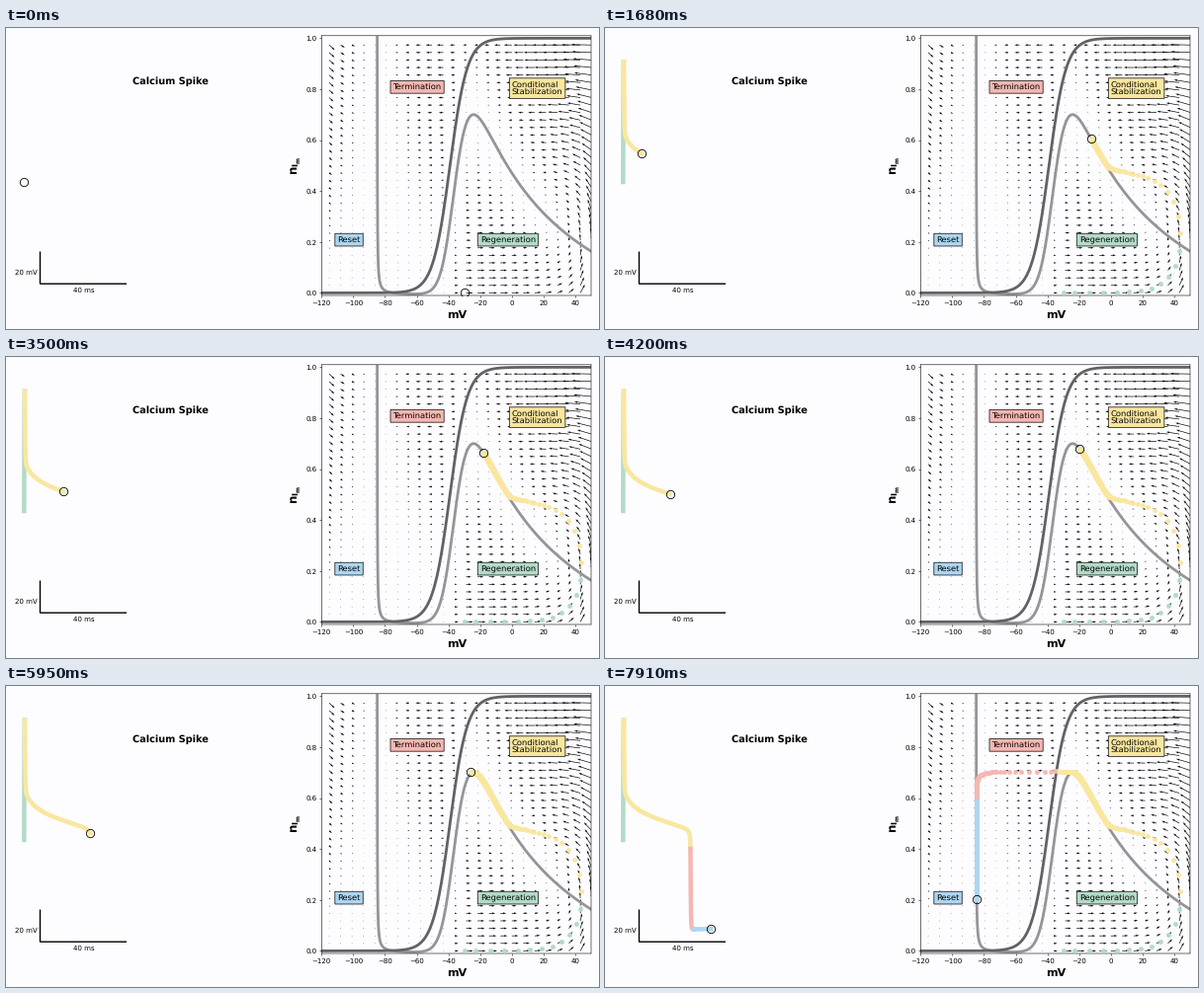
Write a matplotlib script that moves like this. It is 600 by 305 pixels and loops after 8000 ms.

```python
import math

import numpy as np
import matplotlib.pyplot as plt
from matplotlib.animation import FuncAnimation

W, H, DPI = 600, 305, 50
INTERVAL, FRAMES = 40, 200
TICK = 70               # ms between possible picture changes
DT = .025               # integration step, ms of model time
SUB = 20                # integration steps per visible step
LAST_STEP = 81
PLATEAU = 31            # model time at which the spike collapses

PAPER = "#fdfcfe"
GREEN, YELLOW, RED, BLUE = "#b3dbc8", "#f9e79f", "#f5b7b1", "#aed6f1"

plt.rcParams.update({"font.family": "DejaVu Sans", "text.hinting": "none",
                     "path.snap": False})


# Two-variable model: calcium and leak currents against an M-type current
def n_inf(v):
    return 1 / (1 + np.exp(-.185 * (v + 39)))


def nullcline(v, calcium):
    """Gate value at which the voltage stands still."""
    m = 1 / (1 + np.exp(-(v + 38.8) / 5.5))
    inward = calcium * m ** 2 * (115.7 - v)
    leak = .0087 * (-74.6 - v)
    return (inward + leak) / (v + 85)


def flow(v, n, calcium):
    dv = 8.2 * (v + 85) * (nullcline(v, calcium) - n)
    dn = .0043 * np.cosh(.09 * (v + 38.6)) * (n_inf(v) - n)
    return dv, dn


def simulate(calcium, duration):
    v, n, path = -30.0, 0.0, []
    for _ in range(round(duration / DT) + 1):
        dv, dn = flow(v, n, calcium)
        path.append((v, n, dv, dn))
        v, n = v + DT * dv, n + DT * dn
    return np.array(path).T


def tune_calcium(low=.32, high=.39):
    """Find the calcium strength that ends the plateau on time."""
    for _ in range(16):
        mid = (low + high) / 2
        if simulate(mid, PLATEAU)[0, -1] < -33.5:
            low = mid
        else:
            high = mid
    return (low + high) / 2


calcium = tune_calcium()
path_v, path_n, path_dv, path_dn = simulate(calcium, LAST_STEP * SUB * DT)
trace_x = 18.3 + 1.098 * np.arange(len(path_v)) / SUB
trace_y = 156 - 1.65 * (path_v + 30)

# A phase is named by the signs of (dv, dn)
PHASES = [(GREEN, True, True), (YELLOW, False, True),
          (RED, False, False), (BLUE, True, False)]

fig = plt.figure(figsize=(W / DPI, H / DPI), dpi=DPI, facecolor=PAPER)

# Voltage trace, in stage pixels
left = fig.add_axes([0, 0, 1, 1])
left.set(xlim=(0, W), ylim=(H, 0))
left.axis("off")
left.plot([34.5, 34.5, 122], [226.5, 259.2, 259.2], color="black", lw=2,
          solid_capstyle="butt", solid_joinstyle="miter")


def label(x, y, text, size, **style):
    left.text(x, y, text, fontsize=size, ha="center", va="center", **style)


label(166.5, 54.2, "Calcium Spike", 14, weight="bold")
label(20.5, 247.6, "20 mV", 10)
label(78.5, 265.6, "40 ms", 10)
label(456, 291.2, "mV", 16, weight="bold")
label(294, 139.5, r"$\mathbf{n_{I_m}}$", 17, rotation=90)

# Phase plane
plane = fig.add_axes([319.3 / W, 34 / H, 272.7 / W, 263.2 / H],
                     facecolor=PAPER)
plane.set(xlim=(-120, 50), ylim=(-.01, 1.01), xticks=range(-120, 41, 20),
          yticks=np.arange(6) / 5)
plane.tick_params(labelsize=10)

grid_v, grid_n = np.meshgrid(-115.2 + 7.2 * np.arange(24),
                             .0295 * np.arange(34))
grid_dv, grid_dn = flow(grid_v, grid_n, calcium)
plane.quiver(grid_v, grid_n, .023 * grid_dv, 2.5 * grid_dn, scale=1,
             scale_units="dots")
volts = np.linspace(-120, 50, 400)
plane.plot(volts, n_inf(volts), color="#636163", lw=4, zorder=2.1)
volts = -85 + np.geomspace(.05, 135, 600)
plane.plot(volts, nullcline(volts, calcium), color="#969496", lw=4)

for v, n, text, color in [(-75, .8, "Termination", RED),
                          (0, .78, "Conditional\nStabilization", YELLOW),
                          (-110, .2, "Reset", BLUE),
                          (-20, .2, "Regeneration", GREEN)]:
    plane.text(v, n, text, fontsize=12, linespacing=1.0,
               bbox=dict(boxstyle="square,pad=0.3", fc=color, ec="black"))

lines = [left.plot([], [], color=c, lw=6.5, solid_joinstyle="round")[0]
         for c, *_ in PHASES]
dots = [plane.plot([], [], "o", color=c, ms=6.5, mew=.5, zorder=4)[0]
        for c, *_ in PHASES]
ring = dict(marker="o", ms=12, mfc="none", mec="black", mew=1.2, zorder=5)
left_ring, = left.plot([], [], **ring)
plane_ring, = plane.plot([], [], **ring)


def update(frame):
    tick = ((frame + 1) * INTERVAL - 1) // TICK
    end = SUB * min(math.floor((tick + .5) / 1.4), LAST_STEP)
    for (_, rising, opening), line, dot in zip(PHASES, lines, dots):
        active = ((path_dv > 0) == rising) & ((path_dn > 0) == opening)
        active[end:] = False
        dot.set_data(path_v[active], path_n[active])
        active[1:] |= active[:-1]       # join each phase to the next
        line.set_data(trace_x[active], trace_y[active])
    left_ring.set_data([trace_x[end]], [trace_y[end]])
    plane_ring.set_data([path_v[end]], [path_n[end]])
    return [*lines, *dots, left_ring, plane_ring]


anim = FuncAnimation(fig, update, frames=FRAMES, interval=INTERVAL,
                     repeat=True, repeat_delay=0, blit=False)
plt.show()
```
